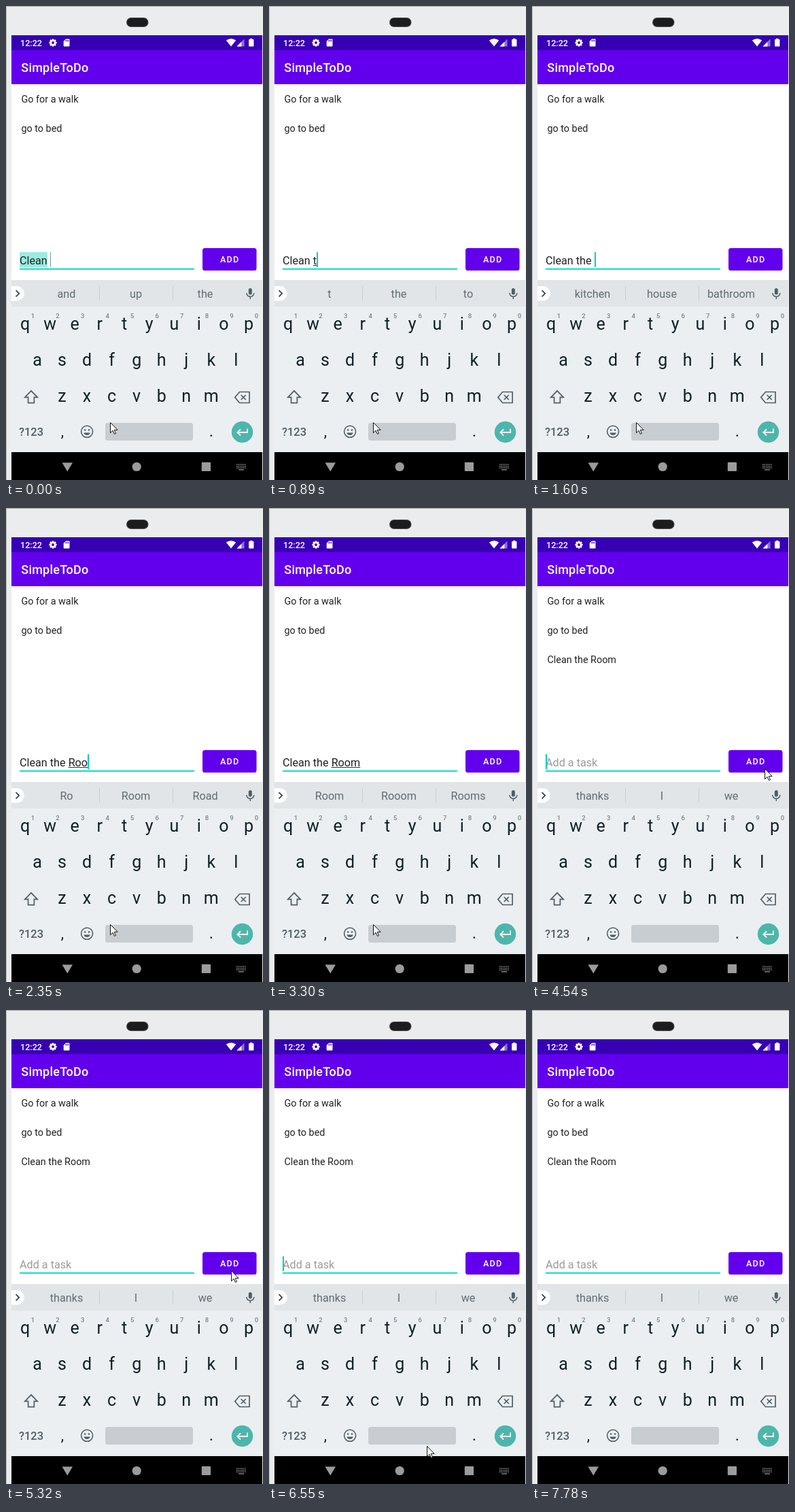
Animation, 378 px wide and 697 px high, one loop 8000 ms. Source, as an HTML page with a canvas:

```html
<!DOCTYPE html>
<html lang="en">
<head>
<meta charset="utf-8">
<title>To-do app</title>
<style>
html, body { margin: 0; width: 100%; height: 100%; overflow: hidden; background: #ebeced; }
canvas { display: block; width: 378px; height: 697px; }
</style>
</head>
<body>
<canvas id="stage"></canvas>
<script>
const W = 378, H = 697, LOOP = 8000;
const TEAL = '#03dac5', PURPLE = '#6200ee', KEY = '#0f2027', ICON = '#4f5d65';
const canvas = document.getElementById('stage');
const ctx = canvas.getContext('2d');
const dpr = window.devicePixelRatio || 1;
canvas.width = W * dpr;
canvas.height = H * dpr;

// Each track lists [start time, value]; a value holds until the next one.
const tracks = {
  glow: [[0, 1], [120, 0.7], [240, 0.42], [360, 0.16], [490, 0]],
  caret: [[0, 1], [120, 2], [490, 0], [890, 2], [3300, 0], [3840, 2], [4270, 0],
    [4390, 2], [4820, 0], [5460, 2], [5880, 0], [6400, 2], [6860, 0], [7410, 2], [7780, 0]],
  typed: [[0, 'Clean '], [890, 'Clean t'], [1090, 'Clean th'], [1290, 'Clean the'],
    [1600, 'Clean the '], [1970, 'Clean the R'], [2140, 'Clean the Ro'],
    [2310, 'Clean the Roo'], [2800, 'Clean the Room'], [4390, '']],
  hints: [[0, 'and up the'], [890, 't the to'], [1090, 'th the that'], [1290, 'the then them'],
    [1600, 'kitchen house bathroom'], [1970, 'R Red Rest'], [2140, 'Ro Room Road'],
    [2480, 'Roo Room Roof'], [2800, 'Room Rooom Rooms'], [4390, 'thanks I we']],
  press: [[0, 0], [4270, 1], [4390, 0.5], [4540, 0]],
  mouse: [[0, [153, 612]], [3440, [162, 601]], [3570, [221, 530]], [3700, [302, 431]],
    [3840, [342, 383]], [5320, [331, 383]], [5880, [329, 386]], [6020, [317, 408]],
    [6150, [280, 480]], [6280, [236, 556]], [6400, [234, 606]], [6550, [232, 641]],
    [6860, [231, 674]], [7010, null]]
};

function at(name, t) {
  let value;
  for (const [start, v] of tracks[name]) if (t >= start) value = v;
  return value;
}

function rect(x, y, w, h, color, r = 0) {
  ctx.fillStyle = color;
  ctx.beginPath();
  ctx.roundRect(x, y, w, h, r);
  ctx.fill();
}

function circle(x, y, r, color) {
  ctx.fillStyle = color;
  ctx.beginPath();
  ctx.arc(x, y, r, 0, Math.PI * 2);
  ctx.fill();
}

function shape(d, color) {
  ctx.fillStyle = color;
  ctx.fill(new Path2D(d));
}

function line(d, color, width = 1.6) {
  ctx.strokeStyle = color;
  ctx.lineWidth = width;
  ctx.stroke(new Path2D(d));
}

function setFont(size, weight = 400, spacing = 0) {
  ctx.font = `${weight} ${size}px Roboto, sans-serif`;
  ctx.letterSpacing = spacing + 'px';
}

function text(str, x, y, size, color, { align = 'left', weight = 400, spacing = 0 } = {}) {
  setFont(size, weight, spacing);
  ctx.textAlign = align;
  ctx.fillStyle = color;
  ctx.fillText(str, x, y);
}

function drawFrame() {
  rect(0, 0, W, H, '#ebeced');
  rect(0, 0, W, 1, '#a3a4a5');
  rect(0, 0, 1, H, '#b9babb');
  rect(177, 17, 32.5, 14, '#4a4a4a', 7);
  rect(178, 18, 30.5, 12, '#1c1c1c', 6);
  rect(8, 43, 369, 613, '#fff');
}

function drawStatus() {
  rect(8, 43, 369, 22, '#3700b3');
  text('12:22', 21, 59, 12.6, '#fff', { weight: 500 });
  for (let i = 0; i < 4; i++) {
    ctx.save();
    ctx.translate(69, 54);
    ctx.rotate(i * Math.PI / 4);
    rect(-1.3, -5.6, 2.6, 11.2, '#fff');
    ctx.restore();
  }
  circle(69, 54, 4.3, '#fff');
  circle(69, 54, 1.9, '#3700b3');
  shape('M88 48.5H92.5Q93.5 48.5 93.5 49.5V58.5Q93.5 59.5 92.5 59.5H85.7Q84.7 59.5 84.7 58.5V51.8Z', '#fff');
  for (const x of [87.3, 89.3, 91.3]) rect(x, 50, 1.1, 2.3, '#3700b3');
  shape('M331 59.5L323.8 50.6Q331 45.6 338.2 50.6Z', '#fff');
  shape('M350.5 48.5V59.5H339.5Z', '#8f71d3');
  shape('M346.3 52.7V59.5H339.5Z', '#fff');
  rect(359, 47.8, 3.4, 2, '#fff');
  rect(357, 49, 7.4, 10.5, '#fff', 0.8);
}

function drawList(count) {
  rect(8, 65, 369, 50, PURPLE);
  text('SimpleToDo', 22.3, 96.7, 18, '#fff', { weight: 500, spacing: 0.225 });
  ['Go for a walk', 'go to bed', 'Clean the Room'].slice(0, count)
    .forEach((item, i) => text(item, 22.4, 141.6 + i * 43.1, 14.4, '#212121'));
}

function drawField(t) {
  const typed = at('typed', t), glow = at('glow', t), caret = at('caret', t);
  setFont(16.2);
  const measure = s => ctx.measureText(s).width;
  const end = 20 + measure(typed);
  if (glow) {
    ctx.globalAlpha = glow;
    rect(20, 362, measure('Clean'), 22, '#9becdf');
    ctx.globalAlpha = 1;
  }
  text(typed || 'Add a task', 20, 379.6, 16.2, typed ? '#212121' : '#9b9b9b');
  // The word being composed is underlined until a space follows it.
  const start = typed.lastIndexOf(' ') + 1;
  if (start < typed.length) {
    const x = 20 + measure(typed.slice(0, start));
    rect(x, 381, end - x, 1, '#333');
  }
  rect(20, 385.8, 257, 2, TEAL);
  if (caret) rect(Math.round(end), 362, caret, 22, caret === 1 ? '#5d9c98' : '#08cdba');
}

function drawButton(press) {
  ctx.save();
  if (press) {
    ctx.shadowColor = `rgba(0,0,0,${0.4 * press})`;
    ctx.shadowBlur = 5 * dpr;
    ctx.shadowOffsetY = 2.5 * dpr;
  }
  rect(289, 356, 79.5, 33, PURPLE, 3.6);
  ctx.restore();
  if (press) rect(289, 356, 79.5, 33, `rgba(255,255,255,${0.24 * press})`, 3.6);
  text('ADD', 329.2, 377.2, 12.6, '#fff', { align: 'center', weight: 500, spacing: 1.12 });
}

function drawHints(hints) {
  rect(8, 403, 369, 39, '#e1e5e7');
  shape('M8 412H16A10.5 10.5 0 0 1 16 433.5H8Z', '#fff');
  line('M14.6 418.2L19.2 422.8L14.6 427.4', '#37434a', 1.8);
  hints.split(' ').forEach((word, i) =>
    text(word, 89 + i * 102, 428.8, 16.2, '#616c72', { align: 'center' }));
  rect(137, 412, 1, 21, '#c6ccd0');
  rect(245, 412, 1, 21, '#c6ccd0');
  rect(356.8, 415, 5, 9.6, ICON, 2.5);
  line('M353.8 422A5.5 5.5 0 0 0 364.8 422M359.3 427.5V431', ICON, 1.5);
}

function drawKeys() {
  rect(8, 442, 369, 214, '#eceff1');
  const row = (letters, x, y) => [...letters].forEach((c, i) =>
    text(c, x + i * 36.55, y, 25, KEY, { align: 'center' }));
  row('qwertyuiop', 28, 476);
  row('asdfghjkl', 46, 529);
  row('zxcvbnm', 82.5, 582);
  [...'1234567890'].forEach((d, i) =>
    text(d, 39.5 + i * 36.55, 458.5, 9.5, '#78848a', { align: 'center', weight: 500 }));

  line('M37 565.8L27.8 575.3H32.6V583.7H41.4V575.3H46.2Z', ICON, 1.7);
  line('M343.5 567.5H358V583.5H343.5L336.8 575.5Z', ICON, 1.7);
  line('M345.7 572L352.7 579M352.7 572L345.7 579', ICON, 1.7);

  text('?123', 37, 632, 16.5, ICON, { align: 'center', weight: 500 });
  text(',', 83, 633, 22, KEY, { align: 'center' });
  text('.', 302, 633, 24, KEY, { align: 'center' });
  line('M127.6 625.8A8.5 8.5 0 1 1 110.6 625.8A8.5 8.5 0 1 1 127.6 625.8', ICON, 1.6);
  circle(116.2, 623.5, 1.3, ICON);
  circle(122, 623.5, 1.3, ICON);
  shape('M114.4 627.5H123.8A4.9 4.9 0 0 1 114.4 627.5Z', ICON);
  rect(146, 613, 129, 26, '#c8cdd1', 3.5);
  circle(347.5, 626.5, 15.7, '#4db6ac');
  line('M355 621.5V627H340.8M345 622.4L340.4 627L345 631.6', '#fff', 1.9);
}

function drawNav() {
  rect(8, 656, 369, 41, '#000');
  shape('M82.5 671.5H98L90.25 684.5Z', '#9b9b9b');
  circle(192.2, 677.5, 6.6, '#9b9b9b');
  rect(287.8, 671, 13.2, 13, '#9b9b9b', 0.8);
  for (let r = 0; r < 3; r++)
    for (let i = 0; i < 6; i++)
      rect(339 + i * 2.4, 673.5 + r * 2.5, 1.4, 1.4, '#8c8c8c');
  rect(342, 681.2, 8, 1.4, '#8c8c8c');
}

function drawMouse(pos) {
  if (!pos) return;
  ctx.save();
  ctx.translate(pos[0] + 0.5, pos[1] + 0.5);
  const arrow = 'M0 0V15.2L3.5 11.8L6 17L8 16L5.7 10.9H10.6Z';
  shape(arrow, '#fff');
  line(arrow, '#111', 1);
  ctx.restore();
}

function draw(t) {
  ctx.setTransform(dpr, 0, 0, dpr, 0, 0);
  drawFrame();
  drawStatus();
  drawList(t >= 4390 ? 3 : 2);
  drawField(t);
  drawButton(at('press', t));
  drawHints(at('hints', t));
  drawKeys();
  drawNav();
  drawMouse(at('mouse', t));
}

const begin = performance.now();
function tick() {
  draw((performance.now() - begin) % LOOP);
  requestAnimationFrame(tick);
}
tick();
</script>
</body>
</html>
```
